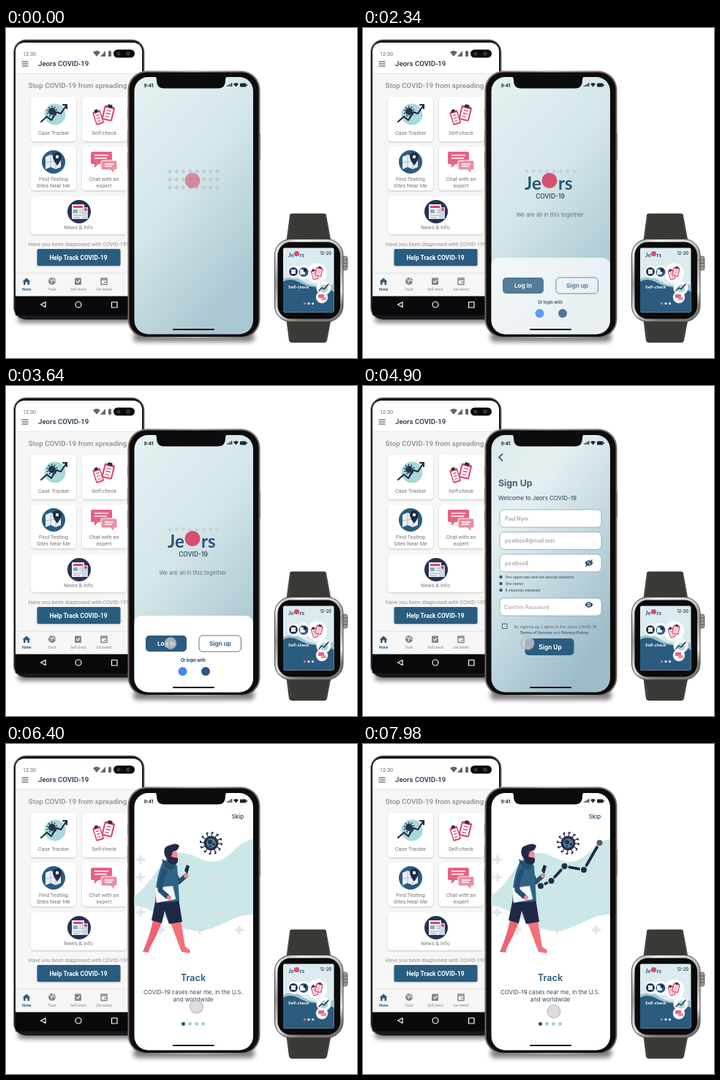
Recreate the animation shown at these times as an HTML page. Size 480 by 451 pixels, loop 8 s.

```html
<!DOCTYPE html>
<html lang="en">
<head>
<meta charset="utf-8">
<title>Jeors COVID-19</title>
<style>
html, body { margin: 0; width: 100%; height: 100%; overflow: hidden; background: #fff; }
svg { display: block; width: 480px; height: 451px; font-family: Inter, Roboto, sans-serif; }
.c { text-anchor: middle; }
.b { font-weight: 700; }
.m { font-weight: 500; }
.droid { font-family: Roboto, sans-serif; }
.logo { font: 700 24px Lato, sans-serif; }
.card { fill: #fff; filter: url(#soft); }
.field { fill: #fff; stroke: #86a8ba; stroke-width: .8; }
.line { fill: none; stroke-linecap: round; stroke-linejoin: round; }
</style>
</head>
<body>
<svg viewBox="0 0 480 451" fill="#24405c">
<defs>
  <linearGradient id="sky" x1="0" y1="0" x2=".55" y2="1">
    <stop offset="0" stop-color="#e6f1f3"/><stop offset=".5" stop-color="#d4e6e9"/><stop offset="1" stop-color="#abc7d2"/>
  </linearGradient>
  <linearGradient id="form" x1="0" y1="0" x2=".6" y2="1">
    <stop offset="0" stop-color="#dceaed"/><stop offset=".3" stop-color="#e6f0f2"/><stop offset=".6" stop-color="#c6dbe2"/><stop offset="1" stop-color="#9dbcca"/>
  </linearGradient>
  <linearGradient id="gold" x2="1">
    <stop offset="0" stop-color="#75665c"/><stop offset=".5" stop-color="#b8a799"/><stop offset="1" stop-color="#75665c"/>
  </linearGradient>
  <linearGradient id="steel" x2=".3" y2="1">
    <stop offset="0" stop-color="#8d8d8d"/><stop offset=".12" stop-color="#eee"/><stop offset=".5" stop-color="#9a9a9a"/><stop offset=".85" stop-color="#e2e2e2"/><stop offset="1" stop-color="#777"/>
  </linearGradient>
  <filter id="soft" x="-20%" y="-20%" width="140%" height="150%"><feDropShadow dx="0" dy="1" stdDeviation="1.3" flood-opacity=".2"/></filter>
  <filter id="blur" x="-20%" y="-200%" width="140%" height="500%"><feGaussianBlur stdDeviation="3"/></filter>
  <clipPath id="screen"><rect x="175.500" y="67" width="162.500" height="351.500" rx="19"/></clipPath>
  <clipPath id="face"><rect x="379" y="300.500" width="69.500" height="88" rx="2"/></clipPath>
  <clipPath id="reveal"><rect id="wipe" x="238" y="120" width="0" height="90"/></clipPath>
  <path id="plus" d="M-3 0H3M0-3V3"/>
  <g id="clip">
    <rect x="-7" y="-9" width="14" height="19" rx="2" fill="#d9486c"/>
    <rect x="-5" y="-6" width="10" height="14" fill="#fff"/>
    <rect x="-3" y="-11" width="6" height="4" rx="1" fill="#28304c"/>
    <path d="M-3-3H3M-3 1H3M-3 5H2" stroke="#d9486c" stroke-width="1.3"/>
  </g>
</defs>

<g filter="url(#blur)" fill="#000" opacity=".5">
  <rect x="16" y="393" width="164" height="10" rx="5"/><rect x="174" y="416" width="166" height="13" rx="6"/>
</g>

<!-- left phone -->
<g class="droid">
  <rect x="10.500" y="16" width="178.500" height="383" rx="17" fill="#17191d" stroke="#8f9399" stroke-width="1.200"/>
  <path d="M13 34Q13 20 27 20H172Q186 20 186 34V367H13Z" fill="#f6f6f7"/>
  <path d="M13 34Q13 20 27 20H172Q186 20 186 34V62H13Z" fill="#fff"/>
  <path d="M13 62.500H186" stroke="#e3e3e3"/>
  <text x="23" y="38" font-size="7.3" fill="#666">12:30</text>
  <path d="M119 33Q124 29 129 33L124 39ZM129 39L136 31V39ZM140 32H141V31H143V32H144V39H140Z" fill="#666"/>
  <rect x="147" y="29.500" width="29" height="11" rx="5.500" fill="#08090b"/>
  <g fill="#30343b"><circle cx="154" cy="35" r="2.600"/><circle cx="167" cy="35" r="3"/></g>
  <path d="M21.500 46H30.500M21.500 49H30.500M21.500 52H30.500" stroke="#24405c" stroke-width="1.2"/>
  <text x="44" y="52" font-size="9.7" class="m" fill="#1f2f48">Jeors COVID-19</text>
  <text x="98" y="82" font-size="9.8" class="c m" fill="#8c8c8c">Stop COVID-19 from spreading</text>
  <g class="card">
    <rect x="34" y="94" width="62" height="61" rx="5"/><rect x="104" y="94" width="62" height="61" rx="5"/>
    <rect x="34" y="162" width="62" height="60" rx="5"/><rect x="104" y="162" width="62" height="60" rx="5"/>
    <rect x="34" y="230" width="131" height="52" rx="5"/>
  </g>
  <g font-size="7.4" class="c" fill="#777">
    <text x="65" y="146">Case Tracker</text><text x="134" y="146">Self-check</text>
    <text x="65" y="209">Find Testing</text><text x="65" y="218">Sites Near Me</text>
    <text x="134" y="209">Chat with an</text><text x="134" y="218">expert</text>
    <text x="99" y="275">News &amp; Info</text>
  </g>
  <g id="tracker">
    <circle cx="67" cy="118" r="14.500" fill="#a9d8d6"/><circle cx="63" cy="114" r="5" fill="#263552"/>
    <circle cx="63" cy="114" r="6.500" fill="none" stroke="#263552" stroke-width="2" stroke-dasharray="1.500 2.600"/>
    <path d="M48 128L56 121 62 126 69 115 75 117 83 105M78 105H83V110" class="line" stroke="#1e2b47" stroke-width="2.200"/>
  </g>
  <use href="#clip" transform="translate(126 122) rotate(-18) scale(.8 1)"/>
  <use href="#clip" transform="translate(140 116) rotate(14) scale(1.050)"/>
  <circle cx="65" cy="183" r="16" fill="#2b5c80"/>
  <path d="M54 176L61 173 68 176 75 173V190L68 193 61 190 54 193Z" fill="#e9f0f3"/>
  <path d="M61 173V190M68 176V193M54 184L75 181" stroke="#a7bbc8" stroke-width="1"/>
  <path d="M70 188Q64 180 64 176A6 6 0 0 1 76 176Q76 180 70 188Z" fill="#1e2b47"/><circle cx="70" cy="176" r="2.200" fill="#fff"/>
  <path d="M118 169H143Q145 169 145 171V184Q145 186 143 186H126L121 191V186H118Q116 186 116 184V171Q116 169 118 169Z" fill="#e56384"/>
  <path d="M132 181H150Q152 181 152 183V192Q152 194 150 194H148V199L143 194H132Q130 194 130 192V183Q130 181 132 181Z" fill="#ef8da1" stroke="#fff"/>
  <path d="M121 174H140M121 178H138M135 186H147M135 189H145" stroke="#fff" stroke-width="1.300"/>
  <circle cx="100" cy="251" r="16" fill="#2a3153"/>
  <rect x="90" y="241" width="17" height="20" fill="#f1f3f6"/><rect x="104" y="245" width="8" height="16" fill="#cbd8e2"/>
  <rect x="92" y="243" width="13" height="3" fill="#d9486c"/><rect x="92" y="248" width="6" height="5" fill="#7eaec4"/>
  <path d="M100 249H105M100 252H105M92 256H104M92 259H101" stroke="#9ba5b4"/><circle cx="109" cy="248" r="2" fill="#d9486c"/>
  <text x="99" y="298" font-size="7.400" class="c" fill="#929292">Have you been diagnosed with COVID-19?</text>
  <rect x="42.500" y="302" width="114" height="23" rx="2" fill="#2b5c80" filter="url(#soft)"/>
  <text x="99" y="317" font-size="8.300" class="c b" fill="#fff">Help Track COVID-19</text>
  <path d="M13 335H186" stroke="#e0e0e0"/>
  <path d="M22.500 346.500L28 341.500 33.500 346.500H32V351H29.500V347.500H26.500V351H24V346.500Z" fill="#2b5c80"/>
  <circle cx="63" cy="346" r="5" fill="#858585"/><rect x="94" y="341.500" width="9" height="9.500" rx="1" fill="#858585"/>
  <path d="M60 344L63 345 62 348M64 342L65 345 67 346M96.500 346L98 348 101 344.500" class="line" stroke="#f6f6f7" stroke-width="1.200"/>
  <path d="M130 342H138V350.500H130ZM130 344H138M134.500 347.500H136" class="line" stroke="#858585" stroke-width="1.500"/>
  <g font-size="4.700" class="c" fill="#888">
    <text x="28" y="359" class="b" fill="#2b5c80">Home</text><text x="63" y="359">Track</text>
    <text x="99" y="359">Self-check</text><text x="134" y="359">Get tested</text>
  </g>
  <rect x="13" y="366.500" width="173" height="26" fill="#08090b"/>
  <g class="line" stroke="#fff" stroke-width="1.200">
    <path d="M47.500 378L54 374.500V381.500Z"/><circle cx="99" cy="378" r="4"/><rect x="144.500" y="374.500" width="7.500" height="7.500"/>
  </g>
</g>

<!-- centre phone -->
<rect x="166.500" y="58.500" width="181" height="365.500" rx="26" fill="url(#gold)"/>
<rect x="168.500" y="60.500" width="177" height="361.500" rx="24" fill="#0c0c0e"/>
<path d="M166.300 110V124M166.300 139V162M166.300 170V193M347.700 144V180" stroke="#8d7b70"/>
<g clip-path="url(#screen)">
  <g id="welcome">
    <rect x="175" y="67" width="163" height="352" fill="url(#sky)"/>
    <g id="rowTop" stroke="#bac5cf" stroke-width="1.600"></g>
    <g id="rowsLow" stroke="#bac5cf" stroke-width="1.600"></g>
    <circle id="mark" cx="255" cy="208.500" r="10.500" fill="#d5506c"/>
    <g id="word" class="logo" fill="#285478"><text x="221" y="221">Je</text><text x="267" y="221">rs</text></g>
    <text id="covid" x="256" y="232.500" font-size="8.500" class="c m">COVID-19</text>
    <text id="tag" x="255.500" y="258" font-size="7.700" class="c" fill="#5f7386">We are all in this together</text>
    <g id="login">
      <path d="M175 419V326Q175 314 187 314H326Q338 314 338 326V419Z" fill="#fff"/>
      <rect x="191" y="341" width="56" height="22" rx="5" fill="#2b5c80"/>
      <rect x="264" y="341" width="57.500" height="22" rx="5" fill="#fff" stroke="#4c7898"/>
      <g font-size="8.200" class="c b"><text x="219" y="355" fill="#fff">Log In</text><text x="293" y="355" fill="#3a6588">Sign up</text></g>
      <text x="256" y="376.500" font-size="5.500" class="c b">Or login with</text>
      <circle cx="241.500" cy="390" r="6" fill="#4285f4"/><circle cx="273" cy="390" r="6" fill="#30568c"/>
    </g>
  </g>

  <g id="signup">
    <rect x="175" y="67" width="163" height="352" fill="url(#form)"/>
    <path d="M190.500 93L186 97.500 190.500 102" class="line" stroke="#24405c" stroke-width="1.600"/>
    <text x="185" y="136.500" font-size="12.400" font-weight="600" fill="#3a4d66">Sign Up</text>
    <text x="185" y="156" font-size="7.900" class="m" fill="#40546a">Welcome to Jeors COVID-19</text>
    <g class="field">
      <rect x="187" y="169" width="139" height="24" rx="6"/><rect x="187" y="199.500" width="139" height="24" rx="6"/>
      <rect x="187" y="230" width="139" height="24" rx="6"/><rect x="187" y="290" width="139" height="24" rx="6"/>
    </g>
    <g font-size="7" font-weight="600" fill="#a0a5ab">
      <text x="194" y="183.500">Paul Nym</text><text x="194" y="214">postbox4@mail.test</text>
      <text x="194" y="244.500">postbox4</text><text x="193" y="304.500" class="m">Confirm Password</text>
    </g>
    <g id="eye"><path d="M303.500 299Q309 291.500 314.500 299 309 306.500 303.500 299Z"/><circle cx="309" cy="299" r="2.300" fill="#fff"/><circle cx="309" cy="299" r="1.200"/></g>
    <use href="#eye" y="-57"/><path d="M304.500 246.500L313.500 237.500" stroke="#24405c" stroke-width="1.400"/>
    <g fill="#2b5c80"><circle cx="188.500" cy="261" r="2.200"/><circle cx="188.500" cy="270" r="2.200"/><circle cx="188.500" cy="279" r="2.200"/></g>
    <g font-size="4.700" font-weight="600" fill="#4a6075">
      <text x="194.500" y="262.700">One uppercase and one special character</text>
      <text x="194.500" y="271.700">One numer</text><text x="194.500" y="280.700">8 character minimum</text>
    </g>
    <rect x="190.500" y="325" width="6.500" height="6.500" fill="none" stroke="#3d5d78" stroke-width=".9"/>
    <g font-size="5.350" class="c" fill="#4a6075">
      <text x="263" y="330.500">By signing up, I agree to the Jeors COVID-19</text>
      <text x="262" y="338.500"><tspan class="b">Terms of Service</tspan> and <tspan class="b">Privacy Policy.</tspan></text>
    </g>
    <rect x="221.500" y="345" width="67" height="23" rx="5" fill="#2b5c80"/>
    <text x="256" y="359.500" font-size="8.300" class="c b" fill="#fff">Sign Up</text>
  </g>

  <g id="track">
    <rect x="175" y="67" width="163" height="352" fill="#fff"/>
    <path d="M338 130C314 133 308 160 283 161 264 161 256 147 236 149 210 153 206 186 175 208V221C200 222 222 246 250 254 286 262 306 232 338 233Z" fill="#cbe7e8"/>
    <g id="crosses" stroke="#dcdfe6" stroke-opacity=".8" stroke-width="1.700"></g>
    <text x="317" y="102" font-size="8" class="c m">Skip</text>
    <g fill="#263049">
      <circle cx="280.500" cy="135.500" r="10"/>
      <circle cx="280.500" cy="135.500" r="11.500" fill="none" stroke="#263049" stroke-width="5" stroke-dasharray="1.300 4.721"/>
      <circle cx="280.500" cy="135.500" r="14.500" fill="none" stroke="#263049" stroke-width="2" stroke-dasharray="3 4.592"/>
      <circle cx="280.500" cy="135.500" r="6.500" fill="#4f7c94"/>
      <circle cx="279" cy="134" r="3"/><circle cx="284" cy="137" r="1.800"/><circle cx="279" cy="139.500" r="1.300"/>
    </g>
    <g id="walker">
      <path d="M201 241L213 244Q206 262 196 280L195 285 187 284 190 277Q197 260 201 241Z" fill="#ee6272"/>
      <path d="M225 244L239 242 245 277 252 282 251 286 240 284Z" fill="#f4707a"/>
      <path d="M205 211H236L241 243 223 246 217 228 213 245 199 241Z" fill="#1f2845"/>
      <path d="M231 177L236 189 246 180" class="line" stroke="#244f70" stroke-width="6"/>
      <path d="M244 173L247 165 251 167 248 178Z" fill="#222b45"/><circle cx="246" cy="180" r="3" fill="#f08b93"/>
      <path d="M215 160Q229 155 234 167L237 214Q220 219 204 213Q205 180 215 160Z" fill="#2f6386"/>
      <path d="M220 147H234L235 157 227 164 219 158Z" fill="#f08b93"/>
      <path d="M217 152Q214 141 222 139 233 134 237 139 236 146 228 147L226 154 235 156Q236 164 230 165 221 165 220 157Z" fill="#222b45"/>
      <path d="M213 157L222 163 231 166 228 172Q216 172 213 157Z" fill="#24506f"/>
      <path d="M203 197L228 194 232 212 206 217Z" fill="#f4f6fa" stroke="#c6d0dc" stroke-width=".6"/>
      <path d="M217 174Q210 188 211 200L220 208" class="line" stroke="#274f72" stroke-width="7"/><circle cx="223" cy="210" r="3" fill="#f08b93"/>
    </g>
    <g clip-path="url(#reveal)" fill="#222b45"><path id="chart" class="line" stroke="#222b45" stroke-width="3.800"/><g id="points"></g></g>
    <text x="256" y="324" font-size="12.600" class="c" font-weight="600" fill="#2b5c80">Track</text>
    <g font-size="7.900" class="c" fill="#3b4856"><text x="256" y="341.500">COVID-19 cases near me, in the U.S.</text><text x="256" y="352">and worldwide</text></g>
    <circle cx="242.500" cy="382.500" r="2.500" fill="#1f5278"/>
    <g fill="#98d5cf"><circle cx="251.500" cy="382.500" r="2.400"/><circle cx="260.500" cy="382.500" r="2.400"/><circle cx="269.500" cy="382.500" r="2.400"/></g>
  </g>

  <circle id="tap" r="9" fill="#d0d0d4" fill-opacity=".75" stroke="#8f9096" stroke-opacity=".7" stroke-width=".9"/>
  <path d="M203 66Q206 67 206 71 206 82.500 216 82.500H290Q300 82.500 300 71 300 67 303 66Z" fill="#0c0c0e"/>
  <rect x="228" y="411" width="57" height="2" rx="1" fill="#111"/>
  <g fill="#1b2530">
    <text x="188.500" y="80.500" font-size="6.400" class="b">9:41</text>
    <path d="M302 80V78.500H303.300V80ZM304 80V77.500H305.300V80ZM306 80V76.200H307.300V80ZM308 80V75H309.300V80ZM311 76.500Q314.500 73.500 318 76.500L314.500 80.500Z"/>
    <rect x="320" y="75.500" width="8.500" height="5" rx="1.200"/><rect x="329" y="77" width="1" height="2"/>
  </g>
</g>

<!-- watch -->
<path d="M388 256Q388 253.500 391 253.500H435Q438 253.500 438 256L445 294H383ZM383 396H445L439 427Q438 430 435 430H391Q388 430 387 427Z" fill="#3a3936"/>
<path d="M389 257L385 289M437 257L443 289M385 402L390 426M443 402L437 426" stroke="#504f4b"/>
<rect x="458.500" y="312" width="8.500" height="19" rx="3" fill="#9a9a9a" stroke="#444" stroke-width=".7"/>
<path d="M460 317H467M460 321.500H467M460 326H467" stroke="#5a5a5a"/>
<rect x="367.500" y="288.500" width="93.500" height="113" rx="22" fill="url(#steel)" stroke="#444" stroke-width="1"/>
<rect x="371.500" y="292.500" width="85.500" height="105" rx="18" fill="#0a0a0b"/>
<g clip-path="url(#face)">
  <rect x="378" y="300" width="71" height="89" fill="#dcebef"/>
  <path d="M378 343Q394 337 406 346 424 357 449 350V389H378Z" fill="#9cc3cd"/>
  <path d="M378 347Q389 341 400 347 412 354 424 354 438 353 449 361V389H378Z" fill="#2b5c80"/>
  <g fill="#fff" stroke="#d2dde3" stroke-width=".5">
    <circle cx="394" cy="333" r="9"/><circle cx="407" cy="333.500" r="10"/><circle cx="432" cy="368" r="8"/><circle cx="434.500" cy="355" r="10"/><circle cx="425.500" cy="335" r="14"/>
  </g>
  <circle cx="393" cy="333" r="6" fill="#2a3153"/><circle cx="407" cy="333.500" r="6.500" fill="#2b5c80"/>
  <rect x="390" y="330" width="6" height="6" fill="#eef2f5"/><rect x="402" y="330" width="7" height="7" fill="#e9f0f3"/>
  <circle cx="409" cy="331" r="2.500" fill="#1e2b47"/>
  <use href="#clip" transform="translate(422 337) rotate(-18) scale(.55 .7)"/><use href="#clip" transform="translate(428 333) rotate(14) scale(.65)"/>
  <circle cx="435" cy="356" r="5.500" fill="#a9d8d6"/>
  <path d="M428 359L432 355 435 357 441 350" class="line" stroke="#1e2b47" stroke-width="1.500"/>
  <rect x="427" y="364" width="8" height="5" rx="1" fill="#e56384"/><rect x="431" y="368" width="7" height="4" rx="1" fill="#ef8da1"/>
  <text x="386" y="355.500" font-size="5.300" class="b" fill="#fff">Self-check</text>
  <g class="logo" style="font-size:8.300px" fill="#285478"><text x="386" y="312.500">Je</text><text x="401.500" y="312.500">rs</text></g>
  <circle cx="397.500" cy="308.500" r="3.600" fill="#d5506c"/>
  <text x="429.500" y="310" font-size="5.600" font-weight="600">12-20</text>
  <g fill="#fff"><circle cx="408.500" cy="376.500" r="1.600" fill="#ee7187"/><circle cx="414" cy="376.500" r="1.500"/><circle cx="419.500" cy="376.500" r="1.500"/></g>
</g>
</svg>
<script>
const LOOP = 8000;
const el = id => document.getElementById(id);
const plus = (x, y, s = 1) => `<use href="#plus" transform="translate(${x} ${y}) scale(${s})"/>`;
const row = y => Array.from({ length: 8 }, (_, i) => plus(224 + i * 9.3, y)).join('');
el('rowTop').innerHTML = row(196);
el('rowsLow').innerHTML = row(207) + row(218);

const crosses = [[158, 184], [182, 184, 211, 292, 319], [206, 265, 292, 319],
  [230, 184, 238, 265, 292], [254, 211, 238, 265, 319]];
el('crosses').innerHTML = crosses.map(([y, ...xs]) => xs.map(x => plus(x, y, 2)).join('')).join('');

// Line segments stop short of the dots.
const pts = [[243, 194], [257.5, 187], [275.5, 167], [302, 172], [323.5, 135]];
el('points').innerHTML = pts.map(([x, y]) => `<circle cx="${x}" cy="${y}" r="4"/>`).join('');
const lastDot = el('points').lastChild;
el('chart').setAttribute('d', pts.slice(1).map(([x, y], i) => {
  const [a, b] = pts[i], k = Math.min(.45, 7 / Math.hypot(x - a, y - b));
  return `M${a + (x - a) * k} ${b + (y - b) * k}L${x - (x - a) * k} ${y - (y - b) * k}`;
}).join(''));

const part = (t, a, b) => Math.max(0, Math.min(1, (t - a) / (b - a)));
const mix = (a, b, p) => a + (b - a) * p;
const easeOut = p => 1 - (1 - p) ** 3;
const easeInOut = p => p * p * (3 - 2 * p);
const backOut = p => 1 + 3 * (p - 1) ** 3 + 2 * (p - 1) ** 2;
const fade = (id, v) => el(id).setAttribute('opacity', v);
const show = (id, on) => el(id).style.display = on ? '' : 'none';

function tapPlace(t) {
  if (t < 4880) {
    const p = backOut(part(t, 2820, 3360));
    return [mix(210, 225, p), mix(428, 351.5, p)];
  }
  const p = easeInOut(part(t, 4880, 5300)), q = part(t, 7480, 7980) ** 2;
  return [mix(225, 260.5, p) + q / 2, mix(351.5, 359, p) + 6.5 * q];
}

function draw(now) {
  const t = now % LOOP;
  show('welcome', t < 3940);
  show('signup', t >= 3940 && t < 6260);
  show('track', t >= 6260);

  fade('mark', mix(.6, 1, part(t, 220, 440)));
  fade('rowTop', mix(1, .7, part(t, 220, 440)));
  fade('rowsLow', 1 - part(t, 600, 860));
  fade('word', part(t, 600, 860));
  fade('covid', .1 * part(t, 740, 860) + .8 * part(t, 1020, 1260) + .1 * part(t, 1420, 1640));
  fade('tag', .4 * part(t, 1020, 1260) + .45 * part(t, 1420, 1640) + .15 * part(t, 1860, 1940));
  fade('login', easeOut(part(t, 2240, 2520)));
  el('wipe').setAttribute('width', 90 * part(t, 6620, 7500));
  lastDot.setAttribute('opacity', .75 * part(t, 7400, 7980));

  const tap = el('tap'), [x, y] = tapPlace(t);
  show('tap', t >= 2840);
  tap.setAttribute('cx', x);
  tap.setAttribute('cy', y);
  tap.setAttribute('r', t >= 3640 && t < 3940 || t >= 6020 && t < 6260 ? 8 : 9);
  requestAnimationFrame(draw);
}
requestAnimationFrame(draw);
</script>
</body>
</html>
```
